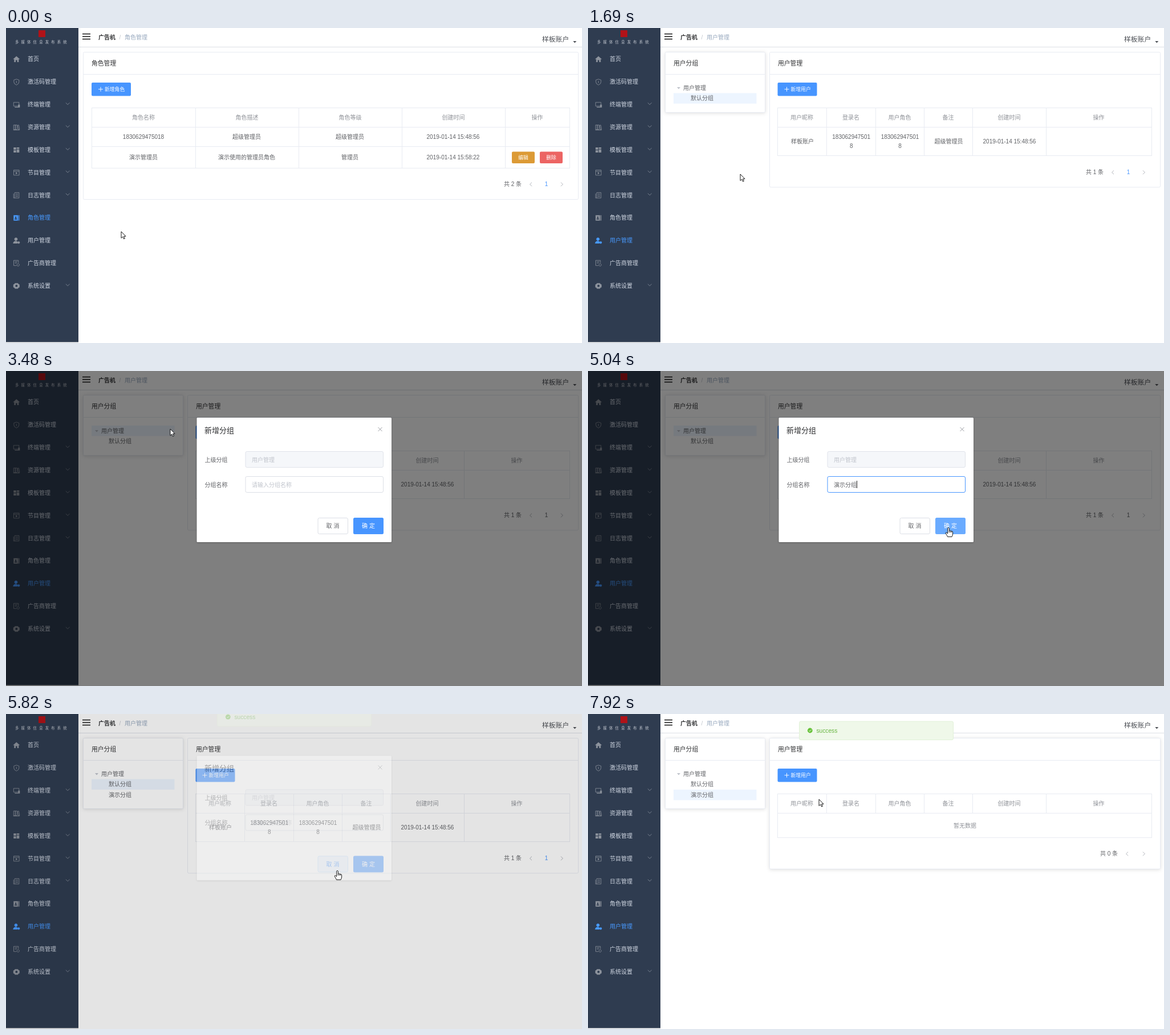
Write an HTML page that moves like this. It is 1010 by 554 pixels and loops after 8000 ms.

```html
<!DOCTYPE html>
<html lang="zh">
<head>
<meta charset="utf-8">
<title>用户管理</title>
<style>
html, body { margin: 0; width: 100%; height: 100%; overflow: hidden; background: #fff; }
svg { display: block; width: 1010px; height: 554px; }
text { font-family: "Liberation Sans", "Noto Sans CJK SC", "Noto Sans CJK", sans-serif; white-space: pre; }
.shade { filter: drop-shadow(0 1px 3px rgba(0,0,0,.13)); }
.pop { filter: drop-shadow(0 1px 1.5px rgba(0,0,0,.25)); }
</style>
</head>
<body>
<svg id="stage" viewBox="0 0 1010 554"></svg>
<script>
const LOOP = 8000;
const BLUE = '#4795ff', LINE = '#e8ebf2', INK = '#606266', DIM = '#909399', PALE = '#c0c4cc', DARK = '#303133';
const ACCOUNT = '样板账户', CODE = '1830629475018';

// ---- drawing helpers ----
function el(parent, tag, attrs = {}, content) {
  const node = document.createElementNS('http://www.w3.org/2000/svg', tag);
  set(node, attrs);
  if (content !== undefined) node.textContent = content;
  parent.appendChild(node);
  return node;
}
function set(node, attrs) {
  for (const k in attrs) node.setAttribute(k, attrs[k]);
}
const show = (node, on) => node.setAttribute('visibility', on ? 'inherit' : 'hidden');
const group = (p, attrs) => el(p, 'g', attrs);
const box = (p, x0, y0, x1, y1, attrs) =>
  el(p, 'rect', { x: x0, y: y0, width: x1 - x0, height: y1 - y0, ...attrs });
const stroke = (p, d, color, width = 1, attrs = {}) =>
  el(p, 'path', { d, fill: 'none', stroke: color, 'stroke-width': width, ...attrs });
// y is the middle of the line of text
const label = (p, x, y, str, fill = INK, size = 10, attrs = {}) =>
  el(p, 'text', { x, y: y + size * 0.36, fill, 'font-size': size, ...attrs }, str);
const mid = (p, x, y, str, fill, size, attrs = {}) =>
  label(p, x, y, str, fill, size, { 'text-anchor': 'middle', ...attrs });

function card(p, x0, x1, bottom, title, cls = '') {
  const r = box(p, x0 + .5, 42.5, x1 + .5, bottom, { rx: 2, fill: '#fff', stroke: LINE, class: cls });
  stroke(p, `M${x0} 81.5H${x1}`, LINE);
  label(p, x0 + 15, 62, title, DARK, 10.8);
  return r;
}
function addButton(p, x, str) {
  box(p, x, 96, x + 69, 119.5, { rx: 2, fill: BLUE });
  stroke(p, `M${x + 12} 107.7h8m-4 -4v8`, '#fff', .9);
  label(p, x + 23, 107.7, str, '#fff', 8.8, { 'font-weight': 500 });
}
function table(p, xs, ys, heads, fullLines) {
  const x0 = xs[0], x1 = xs[xs.length - 1], y1 = ys[ys.length - 1];
  stroke(p, ys.map(y => `M${x0} ${y + .5}H${x1 + 1}`).join(''), LINE);
  stroke(p, xs.map((x, i) => {
    const edge = i === 0 || i === xs.length - 1;
    return `M${x + .5} ${ys[0]}V${edge || fullLines ? y1 : ys[1]}`;
  }).join(''), LINE);
  heads.forEach((h, i) => mid(p, (xs[i] + xs[i + 1]) / 2, 157, h, DIM));
}
function pager(p, x, prev, y, count) {
  label(p, x, y, `共 ${count} 条`);
  stroke(p, `M${prev + 2} ${y - 3}l-3.4 3.4l3.4 3.4M973 ${y - 3}l3.4 3.4l-3.4 3.4`, '#a8abb3', .9);
  return mid(p, 947.5, y, count ? '1' : '', BLUE);
}
function smallButton(p, x, str, fill) {
  box(p, x, 217.5, x + 40, 238, { rx: 2, fill });
  mid(p, x + 20, 228, str, '#fff', 8.8, { 'font-weight': 500 });
}

const svg = document.getElementById('stage');
box(svg, 0, 0, 1010, 554, { fill: '#fff' });

// ---- role page ----
const rolePage = group(svg);
card(rolePage, 135, 1003, 301.5, '角色管理');
addButton(rolePage, 150, '新增角色');
table(rolePage, [150, 332, 513, 694, 875, 988], [140, 174, 208, 246],
  ['角色名称', '角色描述', '角色等级', '创建时间', '操作'], true);
[[CODE, '超级管理员', '超级管理员', '2019-01-14 15:48:56'],
 ['演示管理员', '演示使用的管理员角色', '管理员', '2019-01-14 15:58:22']].forEach((row, r) =>
  row.forEach((s, c) => mid(rolePage, 241 + c * 181, 191 + r * 36, s)));
smallButton(rolePage, 887, '编辑', '#dc9a35');
smallButton(rolePage, 936, '删除', '#ec6463');
pager(rolePage, 873, 920, 274.5, 2);

// ---- user page ----
const userPage = group(svg);
const treeCard = card(userPage, 135, 310, 148, '用户分组', 'shade');
const rowTop = [96, 114.5, 133];
const rows = ['用户管理', '默认分组', '演示分组'].map((name, i) => {
  const g = group(userPage), y = rowTop[i] + 9.3;
  const bg = box(g, 150, rowTop[i], 295.5, rowTop[i] + 18.5);
  if (!i) el(g, 'path', { d: 'M156 104h6l-3 3.4z', fill: PALE });
  label(g, i ? 180 : 167, y, name);
  const tools = group(g), plusX = i ? 245 : 285;
  const plus = stroke(tools, `M${plusX - 3.7} ${y}h7.4m-3.7 -3.7v7.4`, BLUE, .9);
  if (i) {
    stroke(tools, `M262 ${y + 1.5}l4 -5l2.2 1.8l-4 5l-2.4 .5zM262 ${y + 4}h6.5`, BLUE, .8);
    stroke(tools, `M281.3 ${y - 2.3}h7.4M283.6 ${y - 2.5}v-1.4h2.8v1.4M282.2 ${y - 2}v5.8h5.6v-5.8M284 ${y - .3}v2.6m2 -2.6v2.6`, BLUE, .8);
  }
  return { g, bg, tools, plus };
});

const userCard = card(userPage, 318, 1003, 280, '用户管理');
addButton(userPage, 332.5, '新增用户');
const cols = [332, 418, 504, 589, 674, 803, 988];
const heads = ['用户昵称', '登录名', '用户角色', '备注', '创建时间', '操作'];
const filled = group(userPage), empty = group(userPage);
table(filled, cols, [140, 174, 224], heads, true);
mid(filled, 376, 199, ACCOUNT);
[461.7, 547].forEach(x => {
  mid(filled, x, 191, CODE.slice(0, 12));
  mid(filled, x, 207.5, CODE.slice(12));
});
mid(filled, 632.5, 199, '超级管理员');
mid(filled, 739, 199, '2019-01-14 15:48:56');
const pageNo = pager(filled, 873, 920, 253.5, 1);
table(empty, cols, [140, 174, 217], heads, false);
mid(empty, 661, 196, '暂无数据', DIM);
pager(empty, 898, 945, 245.5, 0);

// ---- top bar ----
box(svg, 127, 0, 1010, 33, { fill: '#fff' });
stroke(svg, 'M127 33.5H1010', '#dcdfe6');
stroke(svg, 'M134 10.5h14m-14 4.5h14m-14 4.5h14', '#111', 1.7);
label(svg, 162, 16.5, '广告机', DARK, 10, { 'font-weight': 700 });
label(svg, 198.5, 16.5, '/', PALE);
const crumb = label(svg, 208, 16.5, '', '#97a8be');
label(svg, 940, 20, ACCOUNT, '#4c4f55', 11.8);
el(svg, 'path', { d: 'M994.3 23h6l-3 3.2z', fill: '#4c4f55' });

// ---- sidebar ----
box(svg, 0, 0, 127, 552.5, { fill: '#2f3c50' });
box(svg, 57, 4, 69, 16, { fill: '#b01218' });
label(svg, 16, 24.2, '多媒体信息发布系统', '#c3c8d0', 6.4, { 'letter-spacing': 4.15 });
const hover = box(svg, 0, 0, 127, 39.8, { fill: '#273344' });
const menuNames = ['首页', '激活码管理', '终端管理', '资源管理', '模板管理', '节目管理',
  '日志管理', '角色管理', '用户管理', '广告商管理', '系统设置'];
// [filled shape, outline] around 0,0
const icons = [
  ['M-6 0L0 -5.5L6 0H4V5H1.3V1.5H-1.3V5H-4V0z', ''],
  ['', 'M0 -5L4.5 -3.5V0Q4.5 3.5 0 5.3Q-4.5 3.5 -4.5 0V-3.5zM0 -2v4'],
  ['M-3 4h6v1.2h-6zM3 0h3v5h-3z', 'M-5 -4h9.5v6.5h-9.5z'],
  ['', 'M-5 -4h3v8h-3zM-2 -4h3v8h-3zM2 -3.5l2 -.4l1.5 7.6l-2 .4zM-5.5 4.7h11'],
  ['M-5 -4.5h4.4v4h-4.4zM.4 -4.5h4.6v2.6h-4.6zM-5 .5h4.4v4h-4.4zM.4 -1h4.6v5.5h-4.6z', ''],
  ['M-1.2 -1L2 1L-1.2 3z', 'M-4.8 -4.5h9.6v9h-9.6zM-4.8 -2.3h9.6'],
  ['', 'M-3 -4.8h7.5v9.6h-7.5zM-5 -3v7.8h2M-1.2 -2.3h4m-4 2.3h4m-4 2.3h4'],
  ['M-5 -4.8h7.8v9.6h-7.8zM3.6 -4.8h1.4v9.6h-1.4z', ''],
  ['M-.8 -5.5a2.9 2.9 0 1 1 -.1 0zM-6 5.2Q-5.5 .6 -1 .6Q1.5 .7 2 2V5.2zM4 1.3a2.1 2.1 0 1 1 -.1 0z', ''],
  ['', 'M3.5 -.5V-5h-8.3v9h5M-2.8 -2.7h4.5m-4.5 2.3h3.5M3 .8a2.1 2.1 0 1 1 -.1 0z'],
  ['M-2.7 -4.8h5.4l.6 1.3l2.2 1.2v4.6l-2.2 1.2l-.6 1.3h-5.4l-.6 -1.3l-2.2 -1.2v-4.6l2.2 -1.2zM0 -2a2 2 0 1 0 .1 0z', '']
];
const menu = menuNames.map((name, i) => {
  const y = 54.8 + i * 39.85;
  const icon = group(svg, { transform: `translate(18.3 ${y + .3})` });
  el(icon, 'path', { d: icons[i][0], 'fill-rule': 'evenodd', stroke: 'none' });
  stroke(icon, icons[i][1], 'currentColor', .8);
  if (i === 7) {
    el(icon, 'path', { d: 'M-1.1 -2.5a1.3 1.3 0 1 1 -.1 0zM-3.4 2.8q0 -2.5 2.3 -2.5t2.3 2.5z', style: 'fill:#2f3c50' });
  }
  const text = label(svg, 38, y, name);
  if ((i > 1 && i < 7) || i === 10) stroke(svg, `M104.8 ${y - 3}l3.4 3.2l3.4 -3.2`, '#7f8896', .9);
  return { icon, text };
});

// ---- dialog ----
const mask = box(svg, 0, 0, 1010, 554, { fill: '#000' });
const dialog = group(svg);
box(dialog, 334.5, 82, 676, 301, { rx: 1.5, fill: '#fff', class: 'pop' });
label(dialog, 348, 104, '新增分组', DARK, 13);
stroke(dialog, 'M652.5 99l7 7m0 -7l-7 7', DIM, .9);
label(dialog, 348.5, 156, '上级分组');
box(dialog, 420, 141.5, 661.5, 169.5, { rx: 2.5, fill: '#f5f7fa', stroke: '#e0e3ea' });
label(dialog, 431, 156, '用户管理', PALE);
label(dialog, 348.5, 200, '分组名称');
const input = box(dialog, 420, 185.5, 661.5, 213.5, { rx: 2.5, fill: '#fff' });
const hint = label(dialog, 431, 200, '请输入分组名称', PALE);
const typed = label(dialog, 431, 200, '演示分组');
const caret = stroke(dialog, 'M471.5 193V206', '#222');
const cancel = box(dialog, 547, 258.5, 599.5, 286.5, { rx: 2.5 });
const cancelText = mid(dialog, 573, 272.5, '取 消');
const confirm = box(dialog, 609, 258, 662, 287, { rx: 2.5 });
mid(dialog, 635.5, 272.5, '确 定', '#fff', 10, { 'font-weight': 500 });

// ---- success message ----
const toast = group(svg);
box(toast, 370.5, 13, 640.5, 45.5, { rx: 2.5, fill: '#eff8e9', stroke: '#e1f1d8' });
el(toast, 'circle', { cx: 389.3, cy: 29, r: 4.4, fill: '#67c23a' });
stroke(toast, 'M387.2 29l1.6 1.6l2.8 -3', '#fff', .9);
label(toast, 400.5, 29, 'success', '#67b541', 10.2);

// ---- pointer ----
const pointer = group(svg, { stroke: '#000', 'stroke-width': .9, 'stroke-linejoin': 'round' });
const shapes = {
  arrow: el(pointer, 'path', { fill: '#fff', d: 'M0 0V11.5L2.7 9L4.5 13L6.4 12.2L4.6 8.3H8z' }),
  hand: el(pointer, 'path', { fill: '#fff', d: 'M-1.3 1.3Q0 -.7 1.3 1.3V5.8Q2.7 4.9 3.5 6.2Q4.9 5.5 5.6 6.9Q7.6 6.6 7.6 8.6V12Q7.2 14 6 16.6H-1.5Q-2 14.8 -4.8 10.6Q-5 8.6 -3.2 9.2L-1.3 11zM1.3 5.8V9M3.5 6.4V9M5.6 7V9' }),
  beam: el(pointer, 'path', { fill: 'none', d: 'M-2 -6h4M0 -6V6M-2 6h4' })
};

// ---- timing ----
// spans of activity: first change, last change, number of changes
const spans = [[70, 840, 11], [920, 1690, 11], [1770, 2380, 9], [2550, 2700, 3], [3010, 3010, 1],
  [3190, 3480, 5], [3790, 3940, 3], [4570, 4870, 5], [5040, 5040, 1], [5270, 5430, 3],
  [5660, 6430, 11], [6510, 6590, 2], [6890, 7050, 3], [7290, 7350, 2], [7520, 7920, 6]];
function hold(t) {
  let held = 0;
  for (const [a, b, n] of spans) {
    if (t < a) break;
    const step = n > 1 ? (b - a) / (n - 1) : 1;
    held = Math.min(b, a + Math.floor((t - a + 13) / step) * step);
  }
  return held;
}

const path = [[0, 202, 358], [840, 66, 374], [1000, 66, 374], [1690, 267, 257], [1770, 270, 250],
  [2000, 311, 185], [2200, 308, 112], [2380, 291, 93], [2475, 291, 93], [2700, 288, 102],
  [3715, 288, 102], [3940, 288, 107], [4495, 288, 107], [4645, 480, 198], [4720, 500, 206],
  [4870, 632, 275], [5583, 632, 275], [5814, 581, 275], [6430, 253, 146], [6590, 247, 142],
  [6813, 247, 142], [7050, 221, 142], [7443, 221, 142], [7600, 290, 141], [7760, 350, 162], [7920, 405, 150]];
function pointerAt(t) {
  const i = path.findIndex(k => k[0] > t);
  if (i < 0) return path[path.length - 1].slice(1);
  const [t0, x0, y0] = path[i - 1], [t1, x1, y1] = path[i], f = (t - t0) / (t1 - t0);
  return [x0 + (x1 - x0) * f, y0 + (y1 - y0) * f];
}
// eased 0..1 from a start time
function ease(t, start, span) {
  const f = Math.min(1, Math.max(0, (t - start) / span));
  return 1 - (1 - f) ** 2;
}

function render(now) {
  const t = hold(now), [x, y] = pointerAt(t);
  const over = (x0, y0, x1, y1) => x >= x0 && x < x1 && y >= y0 && y < y1;
  const onUsers = t >= 915, modal = t > 3150 && t < 5900;
  const added = t > 5715, chosen = t > 7270;

  // pages
  const leave = ease(t, 880, 250), enter = ease(t, 1080, 350);
  set(rolePage, { opacity: 1 - leave, transform: `translate(${21 * leave} 0)` });
  set(userPage, { opacity: enter, transform: `translate(${21 * (enter - 1)} 0)` });
  crumb.textContent = onUsers ? '用户管理' : '角色管理';
  menu.forEach(({ icon, text }, i) => {
    const color = i === (onUsers ? 8 : 7) ? '#489aff' : '#8d939d';
    set(icon, { fill: color, color });
    set(text, { fill: color === '#8d939d' ? '#d0d7e2' : color });
  });
  show(hover, x < 127);
  set(hover, { y: 35 + Math.floor((y - 35) / 39.85) * 39.85 });

  // tree and user table
  const rootOpen = t > 3150 && !added;
  const selected = chosen ? 2 : rootOpen ? 0 : 1;
  let onRow = false;
  rows.forEach((r, i) => {
    const hot = onUsers && !modal && (i < 2 || added) && over(150, rowTop[i], 295.5, rowTop[i] + 18.5);
    onRow = onRow || hot;
    show(r.g, i < 2 || added);
    show(r.tools, hot);
    set(r.bg, { fill: i === selected ? '#edf5ff' : hot ? '#f4f6fa' : '#fff' });
    set(r.plus, { stroke: t >= 3010 && t < 3190 ? '#3a7fe0' : BLUE });
  });
  set(treeCard, { height: (added ? 166.5 : 148.5) - 42.5 });
  set(userCard, { height: (chosen ? 272.5 : 280) - 42.5, class: chosen ? 'shade' : '' });
  set(pageNo, { fill: rootOpen ? INK : BLUE });
  show(filled, !chosen);
  show(empty, chosen);

  // dialog
  const shown = ease(t, 3150, 300) - ease(t, 5741, 300);
  const dim = ease(t, 3168, 200) - ease(t, 5706, 200);
  set(mask, { opacity: .5 * dim });
  set(dialog, { opacity: shown ** 1.7, transform: `translate(0 ${-20 * (1 - shown)})` });
  const hasText = t > 4700 && !added;
  set(input, { stroke: t > 4630 && t < 5260 ? BLUE : '#dcdfe6' });
  show(hint, !hasText);
  show(typed, hasText);
  show(caret, t >= 5040 && t < 5260);
  const onCancel = modal && over(547, 258, 600, 287), onConfirm = modal && over(609, 258, 662, 287);
  set(cancel, { fill: onCancel ? '#ecf5ff' : '#fff', stroke: onCancel ? '#c6e2ff' : '#dcdfe6' });
  set(cancelText, { fill: onCancel ? BLUE : INK });
  set(confirm, { fill: t >= 5270 && t < 5340 ? '#3f87e6' : onConfirm ? '#6aabff' : BLUE });

  // message
  set(toast, { opacity: ease(t, 5760, 300), transform: `translate(0 ${-32 * (1 - ease(t, 5760, 400))})` });

  // pointer
  const onInput = modal && over(420, 185, 662, 214);
  const kind = onInput ? 'beam' : x < 127 || onRow || onCancel || onConfirm ? 'hand' : 'arrow';
  for (const k in shapes) show(shapes[k], k === kind);
  set(pointer, { transform: `translate(${x} ${y})` });
}

const start = performance.now();
function tick() {
  render((performance.now() - start) % LOOP);
  requestAnimationFrame(tick);
}
tick();
</script>
</body>
</html>
```
